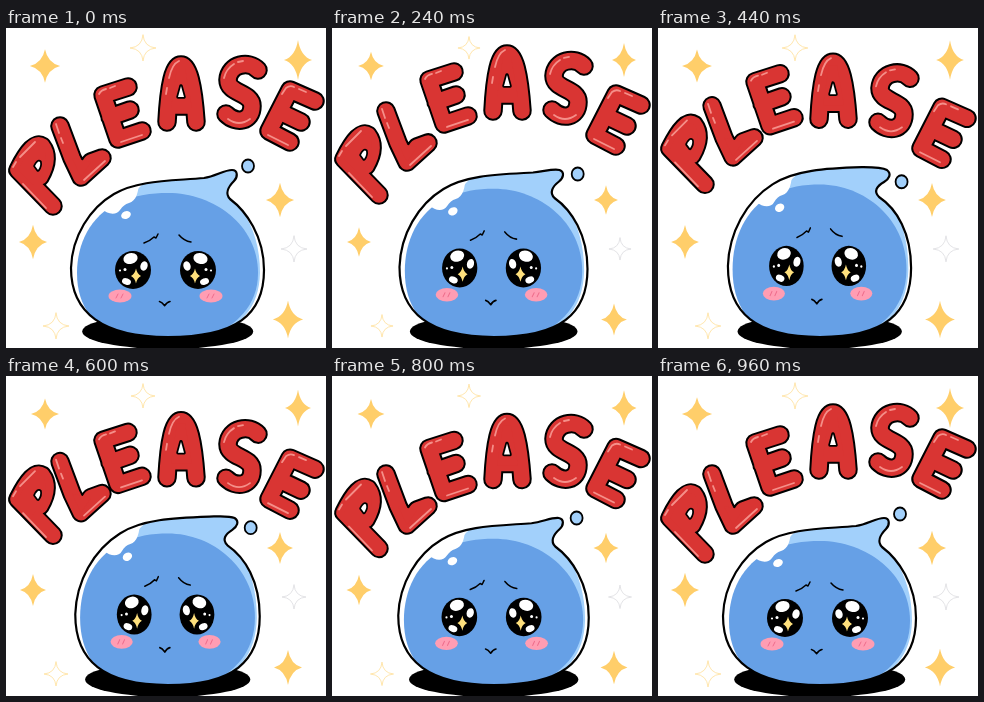
An HTML page with a canvas for the animation above (1000 ms loop, 320x320 px).

```html
<!DOCTYPE html>
<html lang="en">
<head>
<meta charset="utf-8">
<title>Please</title>
<style>
html, body { margin: 0; height: 100%; overflow: hidden; background: #fff; }
canvas { display: block; }
</style>
</head>
<body>
<canvas id="stage" width="320" height="320" aria-label="PLEASE"></canvas>
<script>
const ctx = document.getElementById('stage').getContext('2d');
const TAU = Math.PI * 2;
const path = d => new Path2D(d);

// shape: strokes of the letter, solid: area filled red, hole: counter, shine: highlights
const letters = [
  { shape: 'M47 178L12 142Q27 112 36 118Q45 130 34 149', solid: 'M12 142Q27 112 36 118Q45 130 34 149L27 157Z',
    hole: 'M29 138Q32 132 34 134Q35 138 32 142Z', shine: 'M7 139L10 134M14 129L29 114M17 156L40 180' },
  { shape: 'M54 98L66 130L75 149L96 130L85 134L75 149', solid: 'M66 130L85 134L75 149Z',
    shine: 'M50 96L53 105M55 110L57 115M78 152L99 133' },
  { shape: 'M122 59L97 67L112 111L136 103M104 89L124 82', shine: 'M93 66Q95 62 100 61M104 60L109 58M115 114L136 107' },
  { shape: 'M161 94Q164 37 175 37Q186 37 190 94M166 78L185 78', solid: 'M171 40H179L186 80H165Z',
    hole: 'M175 58L178 69H172Z', shine: 'M163 50Q166 36 173 33M161 60L160 66' },
  { shape: 'M252 42C243 32 223 36 222 52C222 66 246 64 246 78C246 94 230 96 220 86',
    shine: 'M218 50Q220 41 228 36M232 34L237 33M222 91Q233 99 244 91' },
  { shape: 'M309 73L284 62L263 103L284 114M274 84L295 94', shine: 'M276 66L280 60Q284 57 288 59M293 61L300 64M262 107L282 117' }
].map(l => Object.fromEntries(Object.entries(l).map(([k, d]) => [k, path(d)])));

const low = 'M65 240C66 208 84 180 108 166C132 152 165 153 198 150C210 148 218 142 226 142C232 142 232 149 228 153C222 159 219 166 224 171C240 183 258 208 258 242C258 287 230 309 162 309C97 309 65 285 65 240Z';
const tall = 'M70 238C71 205 88 173 115 156C136 142 168 140 204 139C214 139 224 139 229 142C234 146 231 151 226 154C219 158 215 163 221 169C239 181 253 205 253 240C253 285 227 309 162 309C98 309 70 285 70 238Z';
const tallNums = tall.match(/\d+/g);

function blobPath(k) {
  let i = 0;
  return path(low.replace(/\d+/g, n => +n + (tallNums[i++] - n) * k + ' '));
}

const light = path('M126 170Q130 162 136 157L140 120H255L236 182C248 200 254 220 254 245C253 280 235 300 200 309Z');
const dark = path('M71 245C71 216 84 188 112 175C130 167 145 165 162 165C208 165 252 197 252 245C252 281 226 301 195 312H130C95 306 71 285 71 245Z');
const gloss = path('M86 188L96 181C102 187 111 187 114 182C117 178 119 176 123 175C130 173 133 165 133 150L90 150Z');
const brows = path('M138 215Q144 213 148 209L150 210L152 206M173 207Q178 213 185 214');
const mouth = path('M153.5 273.5Q156 274 158.7 277.7Q161 274 164 273.5');
const blush = path('M110 270L112 266M115 270L117 266M201 270L203 266M206 270L208 266');

function fill(p, color) { ctx.fillStyle = color; ctx.fill(p); }
function stroke(p, color, width) {
  ctx.strokeStyle = color;
  ctx.lineWidth = width;
  ctx.stroke(p);
}
function oval(x, y, rx, ry, color, turn = 0) {
  const p = new Path2D();
  p.ellipse(x, y, rx, ry, turn, 0, TAU);
  fill(p, color);
  return p;
}

// waist: how far the sides stay from the centre
function star(x, y, rx, ry, waist = .18) {
  const p = new Path2D();
  p.moveTo(x, y - ry);
  for (let i = 1; i <= 4; i++) {
    const a = i * TAU / 4, b = a - TAU / 8, w = waist * Math.SQRT2;
    p.quadraticCurveTo(x + rx * w * Math.sin(b), y - ry * w * Math.cos(b), x + rx * Math.sin(a), y - ry * Math.cos(a));
  }
  return p;
}

function sparkles(s) {
  for (const [x, y, rx, ry] of [[39, 38, 14, 15.5], [292, 32, 13, 18.5], [27, 214, 13, 16], [274, 172, 13, 16], [282, 291.5, 14, 17.5]])
    fill(star(x, y, rx * s, ry * s), '#ffce6a');
  for (const [x, y, color] of [[137, 20, '#ffe09a'], [288, 221, '#dcdce0'], [50, 298, '#ffe09a']])
    stroke(star(x, y, 12 * s, 12 * s, .08), color, .8);
}

function eye() {
  oval(127, 242, 18, 19, '#000');
  oval(124.5, 230.5, 7.2, 5.4, '#fff', -.25);
  oval(138, 238, 3.6, 4.8, '#fff', .3);
  oval(120.5, 253.5, 4.6, 3.2, '#fff', .35);
  oval(119, 241.5, 1.5, 1.5, '#fff');
  oval(114, 242.5, 1.1, 1.1, '#fff');
  fill(star(130, 248, 5, 7.5, .24), '#ffe07c');
}

function blob(c) {
  const k = (1 - c) / 2, sx = 1 - .04 * k, sy = 1 + .06 * k;
  const body = blobPath(k);
  oval(161.7, 303.5, 85.5 * sx, 17.5, '#000');
  fill(body, '#fff');
  ctx.save();
  ctx.clip(body);
  ctx.translate(162, 310);
  ctx.scale(sx, sy);
  ctx.translate(-162, -310);
  fill(light, '#a2d0fb');
  fill(dark, '#66a0e6');
  fill(gloss, '#fff');
  oval(120, 187, 5, 3.8, '#fff', -.4);
  eye();
  ctx.save();
  ctx.translate(319, 0);
  ctx.scale(-1, 1);
  eye();
  ctx.restore();
  for (const x of [114, 205]) oval(x, 268, 11.5, 6.5, '#ff9db3');
  stroke(blush, '#ee6d8c', 1);
  stroke(brows, '#000', 1.5);
  stroke(mouth, '#000', 1.6);
  ctx.restore();
  stroke(body, '#000', 2.2);
}

function letter({ shape, solid, hole, shine }, dy) {
  ctx.save();
  ctx.translate(0, dy);
  stroke(shape, '#000', 19.5);
  stroke(shape, '#d93533', 15.5);
  if (solid) fill(solid, '#d93533');
  if (hole) {
    stroke(hole, '#000', 3.5);
    fill(hole, '#fff');
  }
  stroke(shine, '#f58f89', 1.8);
  ctx.restore();
}

function draw(ms) {
  const a = Math.floor(ms % 1000 / 40) / 24 * TAU;
  const c = Math.cos(a), c2 = Math.cos(2 * a);
  ctx.fillStyle = '#fff';
  ctx.fillRect(0, 0, 320, 320);
  ctx.lineCap = ctx.lineJoin = 'round';
  sparkles(1 + .08 * c2);
  blob(c);
  stroke(oval(244.2 - .7 * c - 1.5 * c2, 146 - 8 * c, 6, 6.5, '#a2d0fb'), '#000', 1.8);
  letters.forEach((l, i) => {
    const lag = i * TAU / 12;
    letter(l, 11 * (Math.cos(a + lag) - Math.cos(lag)));
  });
}

const start = performance.now();
function tick() {
  draw(performance.now() - start);
  requestAnimationFrame(tick);
}
tick();
</script>
</body>
</html>
```
